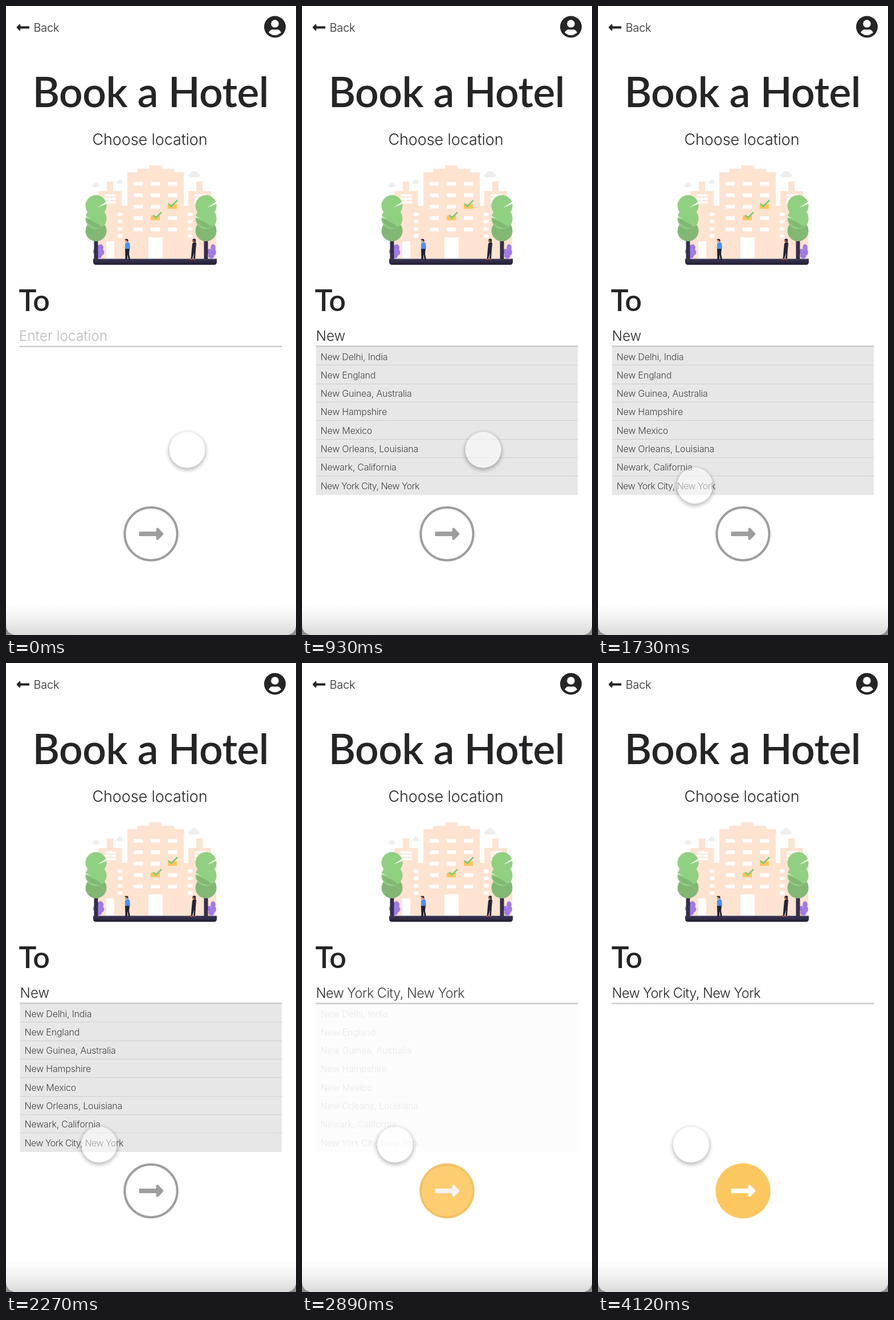
Recreate the animation shown at these times as an HTML page. Size 509 by 1101 pixels, loop 4150 ms.

```html
<!DOCTYPE html>
<html lang="en">
<head>
<meta charset="utf-8">
<title>Book a Hotel</title>
<style>
  html, body { margin: 0; width: 100%; height: 100%; overflow: hidden; background: #fff; }
  svg { display: block; width: 100%; height: 100%; }
  text { font-family: Inter, "Open Sans", sans-serif; font-weight: 350; font-optical-sizing: none; fill: #252527; }
  .title { font: 600 73px Lato, sans-serif; letter-spacing: -.5px; }
  .to { font: 600 52px Lato, sans-serif; }
  .back { font-size: 20px; letter-spacing: -.2px; }
  .subtitle { font-size: 27px; letter-spacing: -.1px; }
  .field { font-size: 24px; letter-spacing: .2px; }
  .chosen { font-size: 23.5px; letter-spacing: -.55px; }
  .hint { fill: #b8b8b8; }
  .row { font-size: 16px; letter-spacing: -.2px; fill: #444; }
  .row.long { letter-spacing: -.55px; }
  .ink { fill: #252527; }
  .wall { fill: #fee3d1; }
  .white { fill: #fff; }
  .cloud { fill: #eee; }
  .line { stroke: #cbcbcb; stroke-width: 2.5; stroke-linecap: round; }
  .rule { stroke: #cfcfcf; }
  .tick { fill: none; stroke: #7fc97a; stroke-width: 2.6; }
  #typed, #done { opacity: 0; }
</style>
</head>
<body>
<svg viewBox="0 0 509 1101" preserveAspectRatio="none">
  <defs>
    <linearGradient id="fade" x2="0" y2="1">
      <stop stop-color="#fff"/>
      <stop offset=".45" stop-color="#f3f3f3"/>
      <stop offset="1" stop-color="#dadada"/>
    </linearGradient>
    <linearGradient id="ground" x2="0" y2="1">
      <stop stop-color="#3b3655"/>
      <stop offset="1" stop-color="#231f33"/>
    </linearGradient>
    <radialGradient id="halo" gradientUnits="userSpaceOnUse" cx="0" cy="2.5" r="39">
      <stop offset=".72" stop-opacity=".25"/>
      <stop offset=".8" stop-opacity=".18"/>
      <stop offset=".9" stop-opacity=".06"/>
      <stop offset="1" stop-opacity="0"/>
    </radialGradient>
    <path id="arrow" d="M0-3Q0-4 1-4H30V-8.3C30-10.4 32.5-11.4 34-10L42.2-1.6Q43.6 0 42.2 1.6L34 10C32.5 11.4 30 10.4 30 8.3V4H1Q0 4 0 3Z"/>
    <path id="cloud" d="M0 8Q0 4 4 4Q5 0 10 0Q15 0 16 4Q20 4 20 8Q20 11 16 11H4Q0 11 0 8Z"/>
    <g id="tree">
      <path d="M-3.5 80H3.5V113H-3.5Z" fill="#332f49"/>
      <circle cy="62.500" r="18.500" fill="#82b874"/>
      <circle cy="41" r="18.500" fill="#8fd081"/>
      <path d="M-17.500 41Q-4 45 11 56Q4 60-10 53Q-17 48-17.500 41Z" fill="#82b874"/>
      <circle cy="18.500" r="18.500" fill="#8fd081"/>
      <path d="M19 11L2 22L19 15Z" class="white"/>
      <path d="M-19 39Q-14 39-7 42L-18 37Z" class="white"/>
    </g>
    <g id="plant" fill="#9f7ae8">
      <ellipse cx="9" cy="6" rx="4" ry="6"/>
      <ellipse cx="3" cy="13" rx="3.500" ry="5"/>
      <ellipse cx="10" cy="14" rx="4" ry="5.500"/>
      <ellipse cx="6" cy="20" rx="5" ry="5"/>
    </g>
  </defs>

  <rect width="509" height="1101" fill="#8e8e8e"/>
  <path d="M0 0H509V1081Q509 1101 489 1101H20Q0 1101 0 1081Z" class="white"/>
  <path d="M0 1046H509V1081Q509 1101 489 1101H20Q0 1101 0 1081Z" fill="url(#fade)"/>

  <use href="#arrow" class="ink" transform="translate(41 37.500) scale(-.523 .523)"/>
  <text class="back" x="48.500" y="45">Back</text>
  <circle cx="472" cy="36.500" r="19" class="ink"/>
  <circle cx="472" cy="31" r="6.800" class="white"/>
  <path class="white" d="M461 46.200C463 42.800 465.500 41 468.500 41Q472 42.200 475.500 41C478.500 41 481 42.800 483 46.200Q478 51.200 472 51.200Q466 51.200 461 46.200Z"/>
  <text class="title" x="46.500" y="177">Book a Hotel</text>
  <text class="subtitle" x="252.500" y="243" text-anchor="middle">Choose location</text>

  <g id="hotel">
    <use href="#cloud" class="cloud" transform="translate(320 289)"/>
    <use href="#cloud" class="cloud" transform="translate(152 309) scale(.58 .75)"/>
    <use href="#cloud" class="cloud" transform="translate(194.500 303.500) scale(.58 .7)"/>
    <path class="wall" d="M162 442V324H177V307H188V324H203V350H213V291H230V285H251V279H273V285H295V291H312V350H320V324H334V307H345V324H360V345H369V442Z"/>
    <path class="white" d="M250 442V405H275V442ZM176 442V412H190V442Z"/>
    <g id="windows" class="white"></g>
    <path fill="#fbc658" d="M284 347h16v8h-16zM254 367h16v8h-16z"/>
    <path class="tick" d="M285 346L290 351L301 340M258 366L263 371L273 361"/>
    <use href="#plant" transform="translate(153.500 417) scale(1.350 1)"/>
    <use href="#plant" transform="translate(354 417) scale(1.050 1)"/>
    <use href="#tree" x="158" y="331"/>
    <use href="#tree" x="351" y="331"/>
    <path d="M153 442.500H370V448Q370 453 365 453H158Q153 453 153 448Z" fill="url(#ground)"/>
    <g>
      <path d="M209 424H217L216 434L218 444H215L213 434L213 444H209.500Z" fill="#22202e"/>
      <path d="M209 416Q213 411 217 415L218 425H209Z" fill="#4f8ff7"/>
      <circle cx="211.500" cy="411" r="2.500" fill="#c98a76"/>
      <path d="M208 409Q211 406 214.500 409V413L212 410Z" fill="#22202e"/>
    </g>
    <g>
      <path d="M327 416Q330 411 334 415L333 426L332 443H329L330 432L327 443H324.500L326 426Z" fill="#25243a"/>
      <circle cx="329.500" cy="411" r="2.500" fill="#9b5a48"/>
      <path d="M327 409Q330 406 333 408.500V416L330.500 410Z" fill="#22202e"/>
      <path d="M323.500 442H327V444.500H323ZM329 442H332.500V444.500H329Z" fill="#a8483f"/>
    </g>
  </g>

  <g id="empty">
    <text class="to" x="22.500" y="534">To</text>
    <text class="field hint" x="23" y="586">Enter location</text>
    <path class="line" d="M25 596H483.500"/>
    <circle cx="254.500" cy="924" r="46.200" fill="#fff" stroke="#9e9e9e" stroke-width="4"/>
    <use href="#arrow" x="233.500" y="924" fill="#9e9e9e"/>
  </g>

  <g id="typed">
    <rect x="20" y="550" width="470" height="310" class="white"/>
    <text class="field" x="24.500" y="586">New</text>
    <rect x="24.500" y="596" width="459.500" height="260" fill="#e7e7e7"/>
    <path class="line" d="M25 595.500H483.500"/>
    <g id="list"></g>
  </g>

  <g id="done">
    <rect x="15" y="475" width="479" height="500" class="white"/>
    <text class="to" x="23.500" y="534">To</text>
    <text class="field chosen" x="24.500" y="586">New York City, New York</text>
    <path class="line" d="M25 596H483.500"/>
    <circle cx="254.500" cy="924" r="48.200" fill="#fdc760"/>
    <use href="#arrow" x="233.500" y="924" class="white"/>
  </g>

  <g id="pointer">
    <path d="M-40-40H40V45H-40ZM31.500 0A31.500 31.500 0 1 0-31.500 0A31.500 31.500 0 1 0 31.500 0Z" fill="url(#halo)" fill-rule="evenodd"/>
    <circle r="31.500" class="white" opacity=".52"/>
  </g>
</svg>

<script>
  const LOOP = 4150;
  const byId = id => document.getElementById(id);

  function add(parent, tag, attrs, content = "") {
    const el = document.createElementNS("http://www.w3.org/2000/svg", tag);
    for (const name in attrs) el.setAttribute(name, attrs[name]);
    el.textContent = content;
    parent.append(el);
  }

  function addWindows(xs, ys, width, height) {
    for (const x of xs) for (const y of ys) add(byId("windows"), "rect", { x, y, width, height });
  }
  addWindows([224, 254, 284], [308, 328, 348, 368, 388], 16, 6.5);
  addWindows([196, 319], [361.5, 374, 387, 399.5], 8.5, 6);
  addWindows([173, 331], [329.5, 335.5, 341.5], 20, 4);

  const places = ["New Delhi, India", "New England", "New Guinea, Australia", "New Hampshire",
    "New Mexico", "New Orleans, Louisiana", "Newark, California", "New York City, New York"];
  places.forEach((place, i) => {
    const y = 597 + 32.3 * i;
    if (i) add(byId("list"), "path", { class: "rule", d: `M24.5 ${Math.round(y) - .5}H484` });
    add(byId("list"), "text", { class: i === 7 ? "row long" : "row", x: 32.5, y: y + 22.5 }, place);
  });

  // Each step is [ms, properties, easing towards the next step].
  function play(id, steps) {
    const last = steps[steps.length - 1];
    const frames = [[0, steps[0][1]], ...steps, [LOOP, last[1]]]
      .map(([ms, props, easing = "linear"]) => ({ ...props, offset: ms / LOOP, easing }));
    byId(id).animate(frames, { duration: LOOP, iterations: Infinity });
  }

  const dissolve = (id, start, length) =>
    play(id, [[start, { opacity: 0 }, "ease-out"], [start + length, { opacity: 1 }]]);

  dissolve("typed", 590, 300);
  dissolve("done", 2690, 280);

  const path = [[1030, 318, 777], [1130, 313, 783], [1230, 297, 798], [1330, 272, 814],
    [1430, 233, 825], [1530, 198, 833], [1630, 178, 837], [1730, 170, 839.5],
    [1880, 165, 842], [2100, 163.5, 843]];
  play("pointer", path.map(([ms, x, y]) => [ms, { transform: `translate(${x}px, ${y}px)` }]));
</script>
</body>
</html>
```
